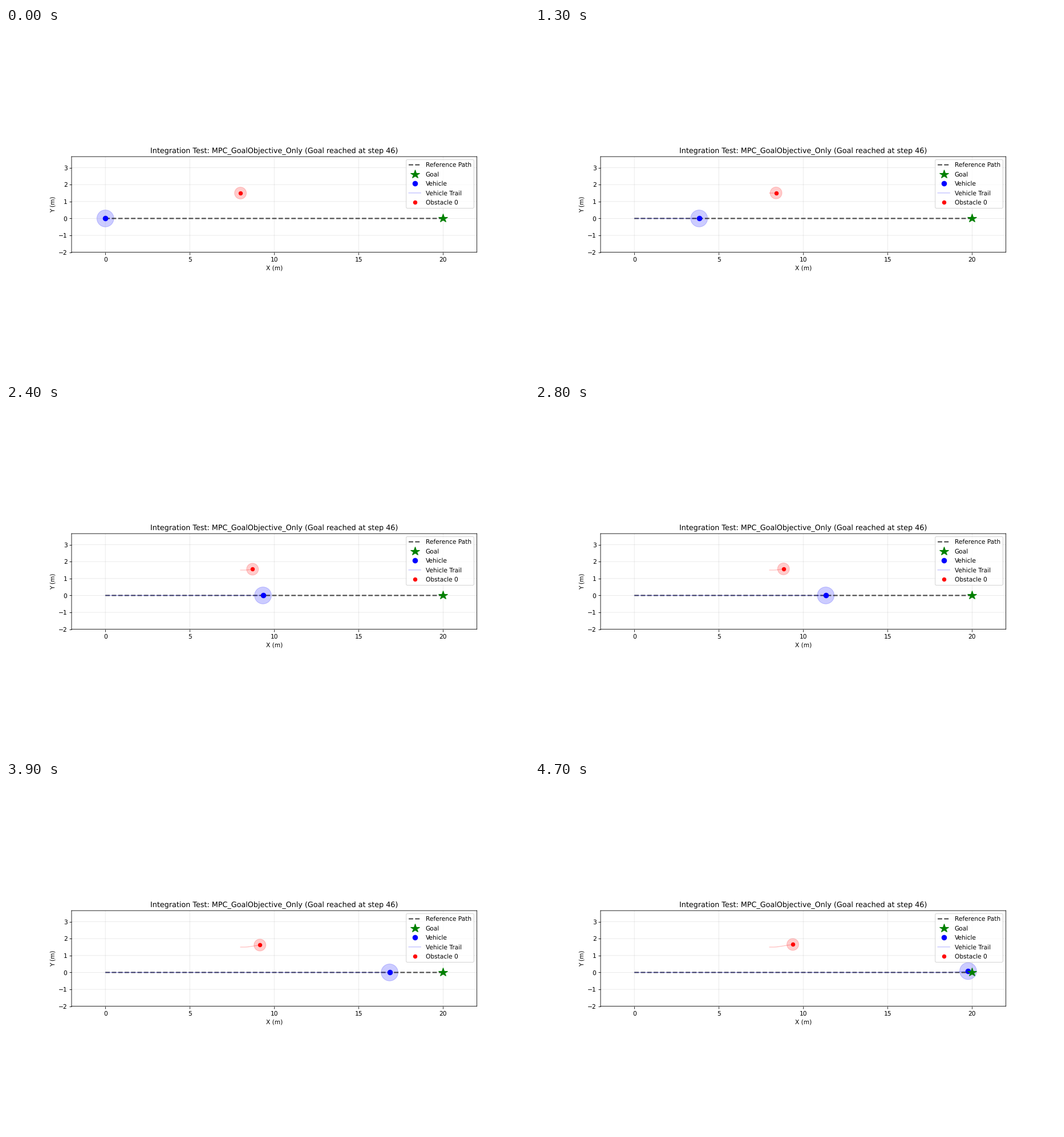
These frames come from a looping animation (917 px wide and 611 px high, 5.1 s). A matplotlib script:

```python
import numpy as np
import matplotlib.pyplot as plt
from matplotlib.animation import FuncAnimation

# Soft, unsnapped lines and linear text widths
plt.rcParams.update({"path.snap": False, "text.hinting": "no_hinting"})

DPI = 76.375
W, H = 917, 611
SHIFT = 0.35                   # axes offset in pixels, right and down
FRAMES, LAST = 51, 47          # the final pose is held to the end of the loop
DT = 0.1
V0, VMAX, ACC = 1.0, 5.0, 3.0
BRAKE_T = 3.855

k = np.arange(LAST + 1)
t = k * DT

# Vehicle: accelerate, cruise, brake and drift slightly off the path
ramp = np.minimum(t, (VMAX - V0) / ACC)
car_x = V0 * ramp + ACC * ramp**2 / 2 + VMAX * (t - ramp)
car_x -= ACC * np.maximum(t - BRAKE_T, 0)**2 / 2
car_y = 0.08 * (np.maximum(car_x - 18.2, 0) / (car_x[-1] - 18.2))**2

# Obstacle: steady drift that turns gently upwards
obs_x = 8 + 0.0302 * k - 0.000017 * k**2
obs_y = 1.5 + np.cumsum(0.0045 * np.clip((k - 8) / 10, 0, 1))

fig, ax = plt.subplots(figsize=((W + 1e-6) / DPI, (H + 1e-6) / DPI), dpi=DPI)
fig.subplots_adjust(left=0.125 + SHIFT / W, right=0.9 + SHIFT / W,
                    bottom=0.11 - SHIFT / H, top=0.88 - SHIFT / H)
ax.set_aspect("equal")
ax.set_xlim(-2, 22)
ax.set_ylim(-2, obs_y[-1] + 2)
ax.set_xlabel("X (m)")
ax.set_ylabel("Y (m)")
ax.set_title("Integration Test: MPC_GoalObjective_Only (Goal reached at step 46)")
ax.grid(True, alpha=0.3)

ax.plot([0, 20], [0, 0], "k--", lw=2, alpha=0.7, label="Reference Path")
ax.plot([20], [0], "g*", ms=15, zorder=3, label="Goal")
car_dot, = ax.plot([], [], "bo", ms=8, label="Vehicle")
car_trail, = ax.plot([], [], "b-", lw=1, alpha=0.3, label="Vehicle Trail")
obs_dot, = ax.plot([], [], "ro", ms=6, label="Obstacle 0")
obs_trail, = ax.plot([], [], "r-", lw=1, alpha=0.3)
car_disc = ax.add_patch(plt.Circle((0, 0), 0.5, color="b", alpha=0.2))
obs_disc = ax.add_patch(plt.Circle((8, 1.5), 0.35, color="r", alpha=0.2))
ax.legend(loc="upper right", labelspacing=0.544, borderpad=0.415)


def place(dot, trail, disc, x, y, n):
    dot.set_data([x[n]], [y[n]])
    trail.set_data(x[:n + 1], y[:n + 1])
    disc.center = x[n], y[n]


def update(i):
    n = min(i, LAST)
    place(car_dot, car_trail, car_disc, car_x, car_y, n)
    place(obs_dot, obs_trail, obs_disc, obs_x, obs_y, n)
    return car_dot, car_trail, car_disc, obs_dot, obs_trail, obs_disc


anim = FuncAnimation(fig, update, frames=FRAMES, interval=100,
                     repeat=True, repeat_delay=0)
plt.show()
```
